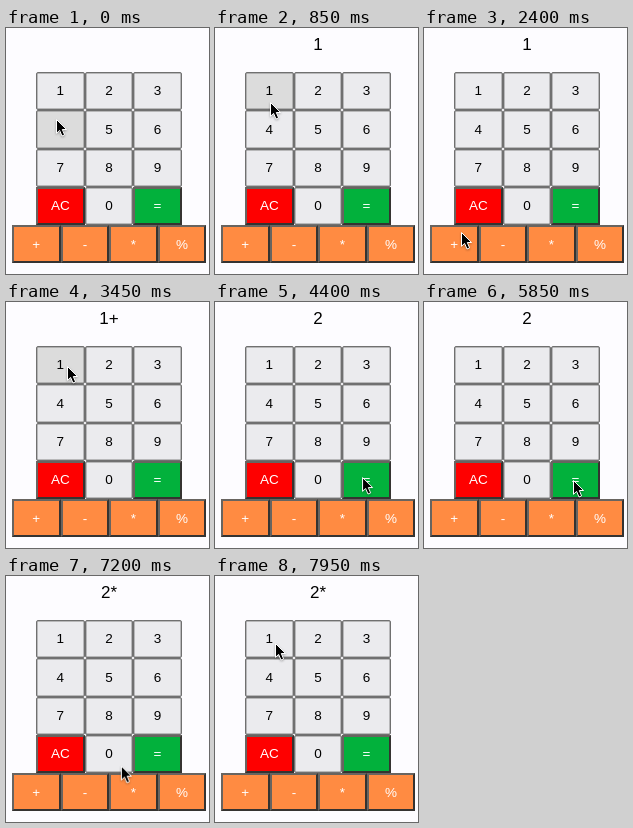
Animation, 203 px wide and 246 px high, one loop 8 s. Source, as an HTML page:

```html
<!DOCTYPE html>
<html lang="en">
<head>
<meta charset="utf-8">
<title>Calculator</title>
<style>
  html, body {
    margin: 0;
    width: 100%;
    height: 100%;
    overflow: hidden;
    background: #fdfcff;
  }
  body {
    position: relative;
    font: 13.5px/1 "Liberation Sans", Arial, sans-serif;
    color: #000;
  }
  .key, .out, .cursor { position: absolute; box-sizing: border-box; }

  .key {
    --w: 48.6px;
    --h: 38.3px;
    left: calc(30px + var(--c) * var(--w));
    top: calc(44px + var(--r) * var(--h));
    width: var(--w);
    height: var(--h);
    display: flex;
    align-items: center;
    justify-content: center;
    border: 1px solid #707070;
    border-radius: 2px;
    box-shadow: inset 0 0 0 .5px #858585;
    background: #ebebee;
  }
  .big {
    border: 2px solid;
    border-color: #686460 #353331 #353331 #686460;
    border-radius: 0;
    box-shadow: none;
    color: #fff;
  }
  .clear { background: #fe0000; }
  .equal { background: #02b13c; }
  .op {
    left: calc(6px + var(--c) * var(--w));
    background: #ff8b42;
  }

  .out {
    left: 0;
    top: 8px;
    width: 206px;
    text-align: center;
    font-size: 17px;
    opacity: 0;
  }
  .cursor {
    left: 0;
    top: 0;
    width: 16px;
    height: 22px;
    overflow: visible;
    filter: drop-shadow(0 1px 1px rgba(0, 0, 0, .3));
  }

  .one { animation: hoverOne 8s step-end infinite; }
  .four { animation: hoverFour 8s step-end infinite; }
  .out { animation: 8s step-end infinite; }
  .o1 { animation-name: show1; }
  .o2 { animation-name: show2; }
  .o3 { animation-name: show3; }
  .o4 { animation-name: show4; }
  .o5 { animation-name: show5; }
  .cursor { animation: move 8s ease-in-out infinite; }

  @keyframes hoverOne {
    0%, 17.5%, 48.125%, 98.75%, 100% { background: #ebebee; }
    5%, 38.125%, 96.875% { background: #dcdcdc; }
  }
  @keyframes hoverFour {
    0%, 18.125% { background: #dcdcdc; }
    5%, 20%, 100% { background: #ebebee; }
  }

  @keyframes show1 { 0%, 30.625%, 100% { opacity: 0; } 8.75% { opacity: 1; } }
  @keyframes show2 { 0%, 45.625%, 100% { opacity: 0; } 30.625% { opacity: 1; } }
  @keyframes show3 { 0%, 55%, 100% { opacity: 0; } 45.625% { opacity: 1; } }
  @keyframes show4 { 0%, 83.75%, 100% { opacity: 0; } 55% { opacity: 1; } }
  @keyframes show5 { 0% { opacity: 0; } 83.75%, 100% { opacity: 1; } }

  @keyframes move {
    0%, .5% { transform: translate(50px, 91px); }
    1.25%, 3% { transform: translate(50px, 86px); }
    6.875%, 12% { transform: translate(55px, 74px); animation-timing-function: ease-in; }
    18.75% { transform: translate(52px, 96px); animation-timing-function: ease-out; }
    28.125%, 31.25% { transform: translate(37px, 204px); }
    40%, 42.4% { transform: translate(62px, 63px); }
    43.125%, 46.25% { transform: translate(61px, 64px); }
    52.5%, 54.375% { transform: translate(147px, 175px); }
    60.625%, 73% { transform: translate(148px, 177px); }
    73.125%, 77.5% { transform: translate(149px, 178px); }
    84% { transform: translate(127px, 222px); }
    86.875%, 88% { transform: translate(123px, 212px); animation-timing-function: linear; }
    90% { transform: translate(115px, 190px); animation-timing-function: ease-out; }
    98.125%, 98.7% { transform: translate(61px, 68px); }
    99.375%, 100% { transform: translate(60px, 67px); }
  }
</style>
</head>
<body>
  <div class="out o1">1</div>
  <div class="out o2">1+</div>
  <div class="out o3">1+1</div>
  <div class="out o4">2</div>
  <div class="out o5">2*</div>

  <div class="key one" style="--c:0;--r:0">1</div>
  <div class="key" style="--c:1;--r:0">2</div>
  <div class="key" style="--c:2;--r:0">3</div>
  <div class="key four" style="--c:0;--r:1">4</div>
  <div class="key" style="--c:1;--r:1">5</div>
  <div class="key" style="--c:2;--r:1">6</div>
  <div class="key" style="--c:0;--r:2">7</div>
  <div class="key" style="--c:1;--r:2">8</div>
  <div class="key" style="--c:2;--r:2">9</div>
  <div class="key big clear" style="--c:0;--r:3">AC</div>
  <div class="key" style="--c:1;--r:3">0</div>
  <div class="key big equal" style="--c:2;--r:3">=</div>
  <div class="key big op" style="--c:0;--r:4">+</div>
  <div class="key big op" style="--c:1;--r:4">-</div>
  <div class="key big op" style="--c:2;--r:4">*</div>
  <div class="key big op" style="--c:3;--r:4">%</div>

  <svg class="cursor" viewBox="0 0 16 22">
    <path d="M.5 .5V14.3L3.6 11.4L6 17L8.6 15.9L6.3 10.5H10.6Z"
          fill="#000" stroke="#fff" stroke-width="1" stroke-linejoin="round"/>
  </svg>
</body>
</html>
```
